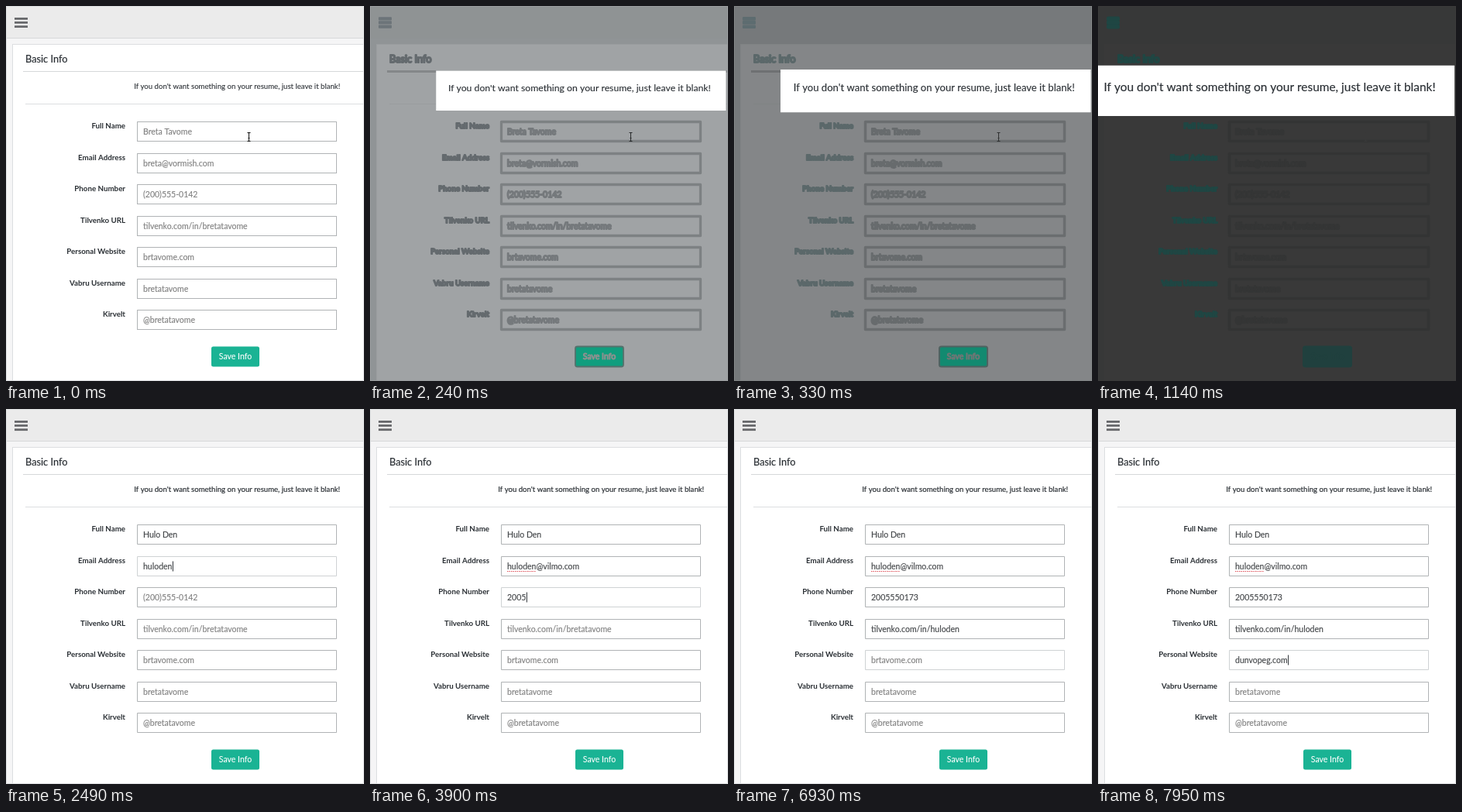
An HTML page with a canvas that plays this animation: 462 by 484 pixels, repeating every 8000 ms.

```html
<!DOCTYPE html>
<html lang="en">
<head>
<meta charset="utf-8">
<title>Resume form</title>
<style>
  html, body { margin: 0; width: 100%; height: 100%; overflow: hidden; background: #fff; }
  canvas { display: block; width: 462px; height: 484px; }
</style>
</head>
<body>
<canvas id="stage" width="462" height="484"></canvas>
<script>
const LOOP = 8000, W = 462, H = 484;
const ctx = document.getElementById('stage').getContext('2d');
const NOTICE = "If you don't want something on your resume, just leave it blank!";
const NOTICE_SIZE = 9.6;

// Each colour in full light, half dimmed and fully dimmed
const palette = {
  page: ['#f5f5f6', '#85898b', '#373838'],
  header: ['#ebebeb', '#85898b', '#373838'],
  panel: ['#ffffff', '#96999b', '#393939'],
  edge: ['#dcdee0', '#929597', '#393939'],
  rule: ['#d6d8da', '#7b7e80', '#393939'],
  bars: ['#67686b', '#6c757b', '#1f4643'],
  ink: ['#2b3035', '#6a7074', '#1f4643'],
  typed: ['#44474a', '#74787b', '#343535'],
  hint: ['#828282', '#74787b', '#343535'],
  border: ['#b0b3b5', '#777b7e', '#333434'],
  focus: ['#cfd2d4', '#777b7e', '#333434'],
  button: ['#1ab394', '#0f9c7c', '#20403e'],
  buttonEdge: ['#1ab394', '#5a6b69', '#20403e'],
  buttonText: ['#ffffff', '#7f8583', '#20403e'],
  pointer: ['#111111', '#2c2e2f', '#393939']
};

const fields = [
  ['Full Name', 'Breta Tavome'],
  ['Email Address', 'breta@vormish.com'],
  ['Phone Number', '(200)555-0142'],
  ['Tilvenko URL', 'tilvenko.com/in/bretatavome'],
  ['Personal Website', 'brtavome.com'],
  ['Vabru Username', 'bretatavome'],
  ['Kirvelt', '@bretatavome']
];

// Typing runs: field, text, time of first key, time of last key
const runs = [
  [0, 'Hulo Den', 1500, 2010],
  [1, 'huloden', 2130, 2490],
  [1, '@vilmo.com', 2820, 3400],
  [2, '2005550173', 3660, 4320],
  [3, 'til', 5010, 5220],
  [3, 'venko.com/', 5280, 6030],
  [3, 'in/huloden', 6090, 6640],
  [4, 'dun', 7380, 7710],
  [4, 'vopeg.com', 7740, 7950]
];
const focusTimes = [1470, 2080, 3510, 4500, 6780];

const clamp = v => Math.min(1, Math.max(0, v));
const mix = (a, b, p) => a + (b - a) * p;
const easeOut = u => Math.sin(clamp(u) * Math.PI / 2);
const spotlightAt = t => t < 1620 ? easeOut(t / 810) : 1 - easeOut((t - 1620) / 810);
const channels = hex => [1, 3, 5].map(i => parseInt(hex.slice(i, i + 2), 16));

function tone(stops, p) {
  const i = p < 0.5 ? 0 : 1;
  const from = channels(stops[i]), to = channels(stops[i + 1]);
  return `rgb(${from.map((c, k) => Math.round(mix(c, to[k], p * 2 - i)))})`;
}

function tonesAt(p) {
  const entries = Object.entries(palette);
  return Object.fromEntries(entries.map(([name, stops]) => [name, tone(stops, p)]));
}

function rect(x, y, w, h, color, radius = 0) {
  ctx.fillStyle = color;
  ctx.beginPath();
  ctx.roundRect(x, y, w, h, radius);
  ctx.fill();
}

function text(str, x, y, size, color, { weight = 400, align = 'left', bold = 0.2 } = {}) {
  ctx.font = `${weight} ${size}px Lato, sans-serif`;
  ctx.textAlign = align;
  ctx.fillStyle = ctx.strokeStyle = color;
  ctx.fillText(str, x, y);
  if (bold) {
    ctx.lineWidth = bold;
    ctx.lineJoin = 'round';
    ctx.strokeText(str, x, y);
  }
}

function typedState(t) {
  const values = fields.map(() => '');
  let lastKey = 0;
  for (const [field, str, start, end] of runs) {
    if (t < start) continue;
    const u = clamp((t - start) / (end - start));
    values[field] += str.slice(0, 1 + Math.floor((str.length - 1) * u + 1e-6));
    lastKey = Math.min(t, end);
  }
  const focus = focusTimes.filter(f => t >= f).length - 1;
  return { values, focus, lastKey };
}

function drawField(i, t, state, soft, c) {
  const [label, hint] = fields[i];
  const value = state.values[i];
  const y = 149.5 + Math.round(i * 40.5);
  const focused = i === state.focus;

  text(label, 154, y + 8.8, 9.75, c.ink, { weight: 700, align: 'right', bold: soft * 2 });
  ctx.lineWidth = 1 + soft * 2.5;
  ctx.lineJoin = 'round';
  ctx.strokeStyle = focused ? c.focus : c.border;
  ctx.strokeRect(169.5, y, 257, 25);
  text(value || hint, 177, y + 16.3, 10.5, value ? c.typed : c.hint, { bold: 0.15 + soft * 2 });

  const width = ctx.measureText(value).width;
  if (focused && value && (t - state.lastKey) % 1000 < 500) {
    rect(177.5 + width, y + 6, 1, 13, c.ink);
  }
  if (i === 1 && t >= 3630) {
    ctx.strokeStyle = '#e0525a';
    ctx.lineWidth = 1;
    ctx.setLineDash([1.5, 1]);
    ctx.beginPath();
    ctx.moveTo(177, y + 19);
    ctx.lineTo(177 + ctx.measureText('huloden').width, y + 19);
    ctx.stroke();
    ctx.setLineDash([]);
  }
}

function drawPointer(t, color) {
  const x = Math.round(313 + 32 * easeOut(t / 480)) + 0.5;
  ctx.strokeStyle = color;
  ctx.lineWidth = 1;
  ctx.beginPath();
  for (const [y, half] of [[163.5, 2], [170.5, 1], [174.5, 2]]) {
    ctx.moveTo(x - half, y);
    ctx.lineTo(x + half, y);
  }
  ctx.moveTo(x, 163.5);
  ctx.lineTo(x, 174.5);
  ctx.stroke();
}

function drawPage(t, p) {
  const c = tonesAt(p);
  const soft = clamp(p * 2);
  const bold = 0.2 + soft * 2;
  rect(0, 0, W, H, c.page);
  rect(0, 0, W, 41, c.header);
  rect(0, 41, W, 1, mixedEdge(c, p));
  rect(8, 49, W - 8, H - 49, c.panel);
  rect(8, 49, W - 8, 1, c.edge);
  rect(8, 49, 1, H - 49, c.edge);
  for (const y of [15, 20, 25.3]) rect(11, y - p * 1.5, 17, 2.8 + p * 3, c.bars, p * 2);

  text('Basic Info', 25, 72.7, 12.75, c.ink, { bold });
  rect(22, 84 - soft, W - 22, 1 + soft * 2, c.rule);
  if (p === 0) text(NOTICE, 298.25, 107.2, NOTICE_SIZE, c.ink, { align: 'center' });
  rect(25, 126, W - 25, 1, c.edge);

  const state = typedState(t);
  fields.forEach((_, i) => drawField(i, t, state, soft, c));

  rect(265, 439.5, 62, 26, c.button, 2.5);
  if (soft > 0) {
    ctx.lineWidth = soft * 2;
    ctx.strokeStyle = c.buttonEdge;
    ctx.stroke();
  }
  text('Save Info', 296, 456.3, 10.5, c.buttonText, { align: 'center', bold: 0.1 + soft });

  ctx.lineWidth = 1;
  ctx.strokeStyle = c.edge;
  ctx.strokeRect(0.5, 0.5, W - 1, H - 1);
  if (t < 1600) drawPointer(t, c.pointer);
}

// The header line melts into the header as the page dims
function mixedEdge(c, p) {
  return p < 0.25 ? c.rule : c.header;
}

function drawSpotlight(p) {
  const scale = mix(1, 1.61, p);
  const x = mix(298.25, 221.5, p ** 1.27);
  const y = p < 0.5 ? mix(104, 106, p * 2) : mix(106, 105, p * 2 - 1);
  ctx.save();
  ctx.translate(x, y);
  ctx.scale(scale, scale);
  ctx.globalAlpha = clamp(p * 5);
  rect(-145.2, -17.5, 293.4, 40.5, '#fff');
  ctx.globalAlpha = 1;
  text(NOTICE, 0, 3.2, NOTICE_SIZE, palette.ink[0], { align: 'center', bold: 0.1 });
  ctx.restore();
}

function draw(t) {
  const p = spotlightAt(t);
  drawPage(t, p);
  if (p > 0) drawSpotlight(p);
}

const begin = performance.now();
function tick() {
  draw((performance.now() - begin) % LOOP);
  requestAnimationFrame(tick);
}
tick();
</script>
</body>
</html>
```
